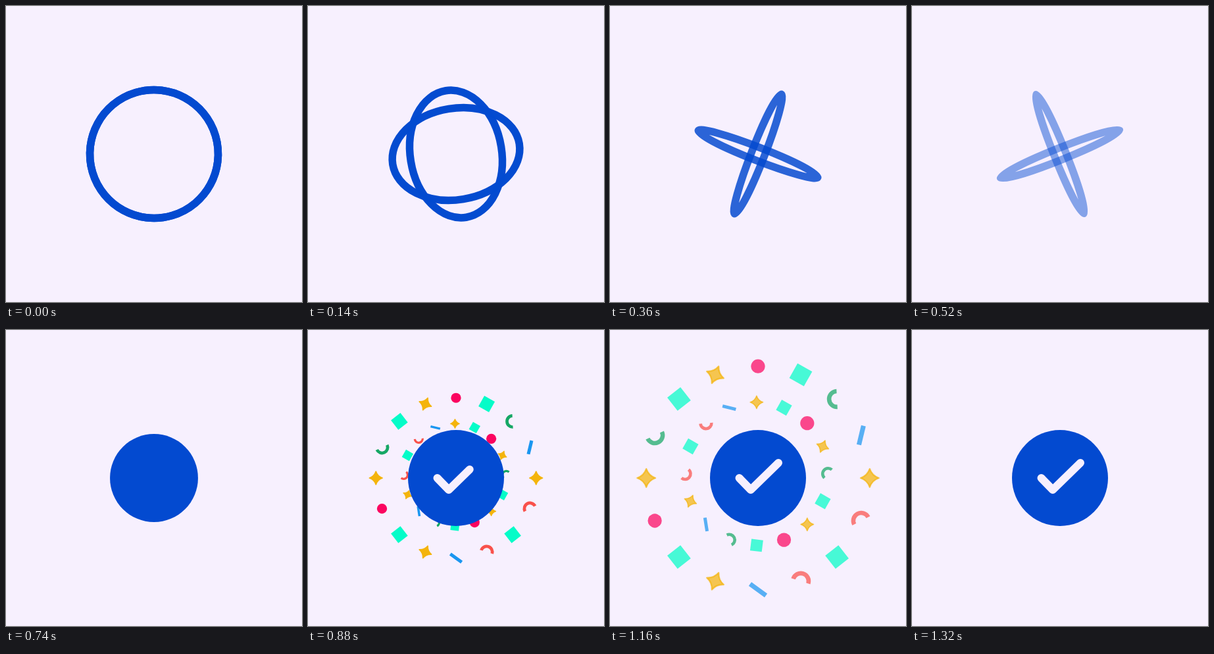
These frames come from a looping animation (450x450 px, 1.56 s). An HTML page with a canvas:

```html
<!DOCTYPE html>
<html lang="en">
<head>
<meta charset="utf-8">
<title>Success check</title>
<style>
  html, body { margin: 0; width: 100%; height: 100%; overflow: hidden; background: #f7f0fe; }
  canvas { display: block; width: 450px; height: 450px; }
</style>
</head>
<body>
<canvas id="stage" width="450" height="450"></canvas>
<script>
const ctx = document.getElementById('stage').getContext('2d');
const LOOP = 1560, PAPER = '#f7f0fe', BLUE = '#034ad0';
const rad = deg => deg * Math.PI / 180;
const progress = (t, from, to) => Math.min(1, Math.max(0, (t - from) / (to - from)));
const easeOut = (p, power) => 1 - (1 - p) ** power;

// Each kind turns by a fixed offset from its direction; stars alternate instead
const kinds = {
  star: { draw: star, color: '#f4b40c', turn: (deg, i) => i % 2 * 22 },
  square: { draw: square, color: '#04fcc8', turn: deg => deg + 7 },
  dot: { draw: () => dot(10), color: '#fb0560', turn: deg => deg },
  bar: { draw: bar, color: '#1a96f0', turn: deg => deg - 54 },
  green: { draw: arc, color: '#16a765', turn: deg => deg + 42 },
  red: { draw: arc, color: '#f9514b', turn: deg => deg + 40 }
};

// Two rings of evenly spaced pieces, listed clockwise from the right
const confetti = [
  { x: 0, y: 0, radius: 160, size: 1, names:
    'star red square red bar star square dot star green square star dot square green bar' },
  { x: -2, y: -6, radius: 102.5, size: .7, names:
    'green square star dot square green bar star red square red bar star square dot star' }
];

function star(size) {
  const r = 13 * size;
  ctx.beginPath();
  ctx.moveTo(r, 0);
  for (let i = 0; i < 4; i++) {
    const mid = rad(i * 90 + 45), tip = rad(i * 90 + 90);
    ctx.quadraticCurveTo(r * .36 * Math.cos(mid), r * .36 * Math.sin(mid),
                         r * Math.cos(tip), r * Math.sin(tip));
  }
  ctx.closePath();
  ctx.lineWidth = r * .17;
  ctx.fill();
  ctx.stroke();
}

function square(size) {
  const side = 24 * size;
  ctx.fillRect(-side / 2, -side / 2, side, side);
}

function dot(r) {
  ctx.beginPath();
  ctx.arc(0, 0, r, 0, 2 * Math.PI);
  ctx.fill();
}

function bar(size) {
  const length = 28 * size, width = 6.7 * size;
  ctx.fillRect(-length / 2, -width / 2, length, width);
}

// Half ring, open towards its rotation
function arc(size) {
  ctx.beginPath();
  ctx.arc(0, 0, 11.3 * size, rad(90), rad(270));
  ctx.lineWidth = 6.2 * size;
  ctx.stroke();
}

function drawRings(t) {
  const squash = progress(t, 20, 365) ** 1.1;
  const angle = rad(.27 * (440 - t));
  ctx.globalAlpha = 1 - progress(t, 20, 640) ** 3;
  ctx.strokeStyle = BLUE;
  ctx.lineWidth = 11.5;
  for (const turn of [0, Math.PI / 2]) {
    ctx.beginPath();
    ctx.ellipse(0, 0, 97.5, 97.5 - 88.5 * squash, angle + turn, 0, 2 * Math.PI);
    ctx.stroke();
  }
  ctx.globalAlpha = 1;
}

function drawConfetti(t) {
  const spread = t => easeOut(progress(t, 720, 1320), 4);
  const scale = spread(t) / spread(1020);
  ctx.save();
  ctx.globalAlpha = 1 - progress(t, 1100, 1320);
  ctx.scale(scale, scale);
  for (const { x, y, radius, size, names } of confetti) {
    names.split(' ').forEach((name, i, all) => {
      const { draw, color, turn } = kinds[name];
      const deg = 360 * i / all.length;
      ctx.save();
      ctx.translate(x + radius * Math.cos(rad(deg)), y + radius * Math.sin(rad(deg)));
      ctx.rotate(rad(turn(deg, i)));
      ctx.fillStyle = ctx.strokeStyle = color;
      draw(size);
      ctx.restore();
    });
  }
  ctx.restore();
}

function drawCheck(t) {
  const drawn = easeOut(progress(t, 770, 960), 2);
  if (!drawn) return;
  ctx.save();
  ctx.strokeStyle = PAPER;
  ctx.lineWidth = 12;
  ctx.lineCap = 'round';
  ctx.setLineDash([84 * drawn, 200]);
  ctx.beginPath();
  ctx.moveTo(-28.5, 0);
  ctx.lineTo(-11, 18);
  ctx.lineTo(31, -23);
  ctx.stroke();
  ctx.restore();
}

function render(t) {
  ctx.setTransform(1, 0, 0, 1, 0, 0);
  ctx.fillStyle = PAPER;
  ctx.fillRect(0, 0, 450, 450);
  ctx.translate(225, 225);
  ctx.lineJoin = 'round';
  if (t < 640) drawRings(t);
  if (t > 720 && t < 1320) drawConfetti(t);
  ctx.fillStyle = BLUE;
  dot(73 * easeOut(progress(t, 600, 850), 3));
  drawCheck(t);
}

const start = performance.now();
function frame() {
  render((performance.now() - start) % LOOP);
  requestAnimationFrame(frame);
}
frame();
</script>
</body>
</html>
```
